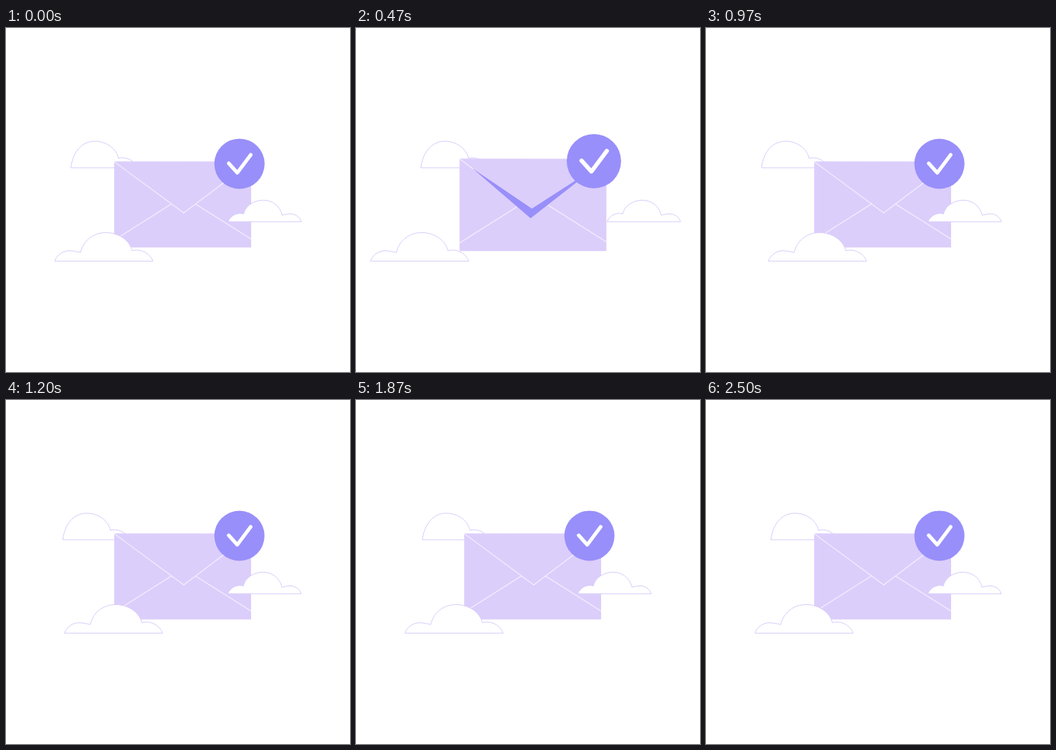
An HTML page for the animation above (2530 ms loop, 480 by 480 pixels).

```html
<!DOCTYPE html>
<html lang="en">
<head>
<meta charset="utf-8">
<title>Message sent</title>
<style>
  html, body { margin: 0; width: 100%; height: 100%; overflow: hidden; background: #fff; }
  svg { display: block; width: 100vw; height: 100vh; }
  .cloud { fill: #fff; stroke: #d8cbfb; stroke-width: 1; vector-effect: non-scaling-stroke; }
  .lilac { fill: #dccefb; }
  .violet { fill: #988ffa; }
  .crease { fill: none; stroke: #f5f0ff; stroke-width: 1.1; }
  .tick { fill: none; stroke: #fff; stroke-width: 5; stroke-linecap: round; stroke-linejoin: round; }
</style>
</head>
<body>
<svg viewBox="0 0 480 480">
  <defs>
    <path id="puff" class="cloud" d="M0 0C3 -9 12 -14.5 20 -14.5C26 -14.5 31 -13 36 -12C40 -29 54 -39.8 71.5 -39.8C89 -39.8 105 -29 108 -14.5C120 -18 133 -11 137 0Z"/>
  </defs>
  <path id="topCloud" class="cloud" d="M90.5 195C93 174 105 158 124 158C140 158 154 168 157 182C165 179 178 183 184 195Z"/>
  <g id="envelope">
    <path class="lilac" d="M151 186.3H342V306.3H151Z"/>
    <path class="crease" d="M151 296L247.5 235L342 294.5"/>
    <path id="flap" class="lilac"/>
    <path class="crease" d="M151 186.5L168.5 199.4M327.5 198L342 187"/>
    <path id="edge" class="crease"/>
    <path id="gap" class="violet"/>
    <g id="badge">
      <circle class="violet" r="35"/>
      <path id="tick" class="tick" d="M-15 -.7L-3 12.5L15.7 -12.5"/>
    </g>
  </g>
  <use id="lowCloud" href="#puff"/>
  <use id="sideCloud" href="#puff"/>
</svg>
<script>
const LOOP = 2530;
const el = id => document.getElementById(id);
const place = (id, transform) => el(id).setAttribute('transform', transform);
const span = (t, from, to) => Math.min(1, Math.max(0, (t - from) / (to - from)));
const smooth = (t, from, to) => {
  const u = span(t, from, to);
  return u * u * (3 - 2 * u);
};
const easeOut = (t, to) => 1 - (1 - span(t, 0, to)) ** 2.4;
// Quick rise to 1 at peak, soft return to 0 at end
const pulse = (t, peak, end) => easeOut(t, peak) - smooth(t, peak, end);

function draw(t) {
  const grow = pulse(t, 300, 800);
  const open = smooth(t, 150, 500) - smooth(t, 500, 870);

  place('envelope', `translate(240 240) scale(${1 + .1 * grow}) translate(-240 -240)`);
  place('badge', `translate(325.7 189.5) scale(${1 + .1 * pulse(t, 230, 530)})`);
  place('tick', `scale(${1 + .085 * grow})`);

  const upper = `${248 - 3 * open} ${258 - 7 * open}`;
  const lower = `${248 - 4.7 * open} ${258 + 6 * open}`;
  el('flap').setAttribute('d', `M151 186.5L${lower}L342 187Z`);
  el('edge').setAttribute('d', `M168.5 199.4L${upper}L327.5 198`);
  el('edge').setAttribute('opacity', 1 - span(open, 0, .1));
  el('gap').setAttribute('d', `M168.5 199.4L${upper}L327.5 198L${lower}Z`);

  const low = 68.3 - 51 * easeOut(t, 391) + 72 * smooth(t, 391, 1041) - 21 * smooth(t, 1041, 1430);
  const side = 412 + 45 * pulse(t, 350, 1000);
  const top = -13.2 * smooth(t, 530, 1000) + 15.4 * smooth(t, 1000, 1900) - 2.2 * smooth(t, 1900, 2300);
  place('lowCloud', `translate(${low} 325.3)`);
  place('sideCloud', `translate(${side} 270.3) scale(-.748 .755)`);
  place('topCloud', `translate(${top} 0)`);
}

function tick() {
  draw(performance.now() % LOOP);
  requestAnimationFrame(tick);
}
tick();
</script>
</body>
</html>
```
